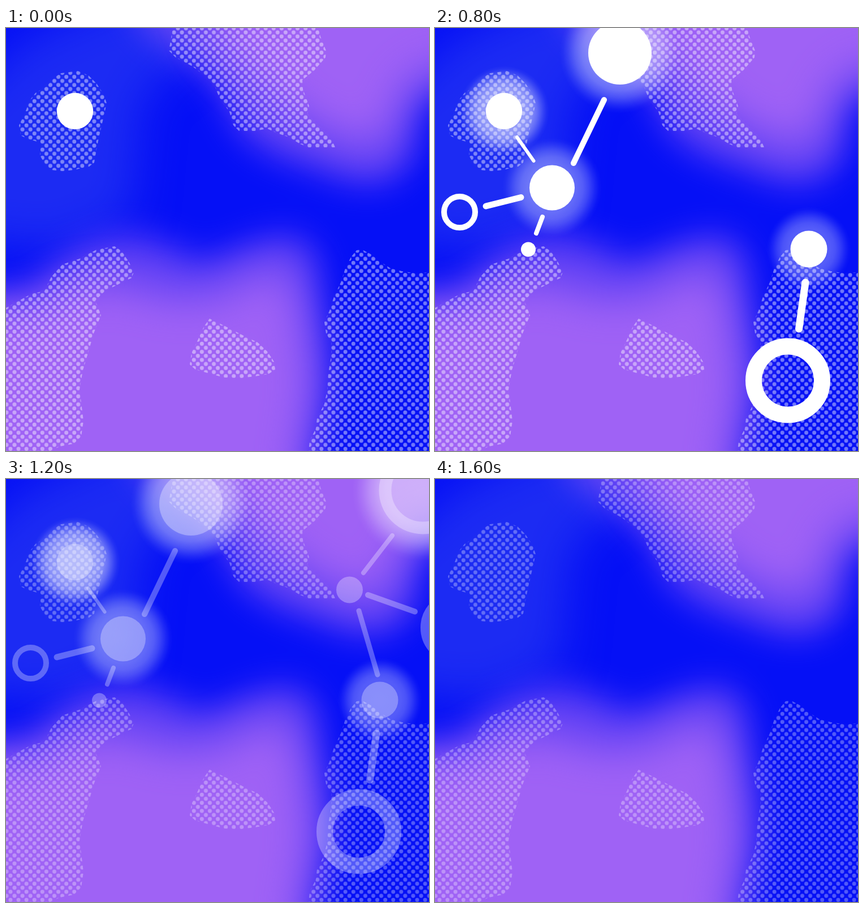
These frames come from a looping animation (748 px wide and 748 px high, 1.7 s). An HTML page:

```html
<!DOCTYPE html>
<html lang="en">
<head>
<meta charset="utf-8">
<title>Network loop</title>
<style>
  html, body { margin: 0; width: 100%; height: 100%; overflow: hidden; background: #0510f6; }
  svg { display: block; width: 100vw; height: 100vh; }
</style>
</head>
<body>
<svg id="stage" viewBox="0 0 748 748" xmlns="http://www.w3.org/2000/svg">
  <defs>
    <filter id="soft" filterUnits="userSpaceOnUse" x="-200" y="-200" width="1150" height="1150" color-interpolation-filters="sRGB">
      <feGaussianBlur stdDeviation="31"/>
    </filter>
    <filter id="softer" filterUnits="userSpaceOnUse" x="-200" y="-200" width="1150" height="1150" color-interpolation-filters="sRGB">
      <feGaussianBlur stdDeviation="38"/>
    </filter>
    <radialGradient id="halo">
      <stop offset="0" stop-color="#fff"/>
      <stop offset=".5" stop-color="#fff" stop-opacity=".96"/>
      <stop offset=".62" stop-color="#fff" stop-opacity=".84"/>
      <stop offset=".74" stop-color="#fff" stop-opacity=".58"/>
      <stop offset=".86" stop-color="#fff" stop-opacity=".25"/>
      <stop offset=".94" stop-color="#fff" stop-opacity=".07"/>
      <stop offset="1" stop-color="#fff" stop-opacity="0"/>
    </radialGradient>
    <pattern id="dots" patternUnits="userSpaceOnUse" x="579" y="208" width="14.1" height="14.3">
      <g id="cell" fill="#fff"></g>
    </pattern>
  </defs>

  <rect width="748" height="748" fill="#0510f6"/>
  <g filter="url(#softer)" fill="#1c2bf3">
    <path d="M40 20 L260 -80 L340 40 L240 120 L220 330 L90 390 L-80 370 L-80 130Z"/>
  </g>
  <g fill="#9f62f5">
    <g filter="url(#soft)" opacity=".58">
      <path d="M-80 468 L40 463 L90 420 L150 378 L220 366 L280 380 L340 415 L400 395 L450 375 L510 365 L548 400 L550 470 L562 560 L566 630 L556 690 L540 760 V850 H-80Z"/>
      <path d="M215 -80 L238 -10 L295 35 L355 75 L390 125 L415 185 L475 225 L555 252 L620 276 L680 272 L722 225 L724 160 L740 122 L780 112 H850 V-80Z"/>
    </g>
    <g filter="url(#softer)">
      <path d="M-120 500 L60 498 L120 455 L200 450 L300 478 L380 470 L450 432 L500 428 L518 475 L532 560 L540 630 L532 690 L520 760 V900 H-120Z"/>
      <path d="M315 -120 L375 20 L450 95 L520 160 L600 198 L655 212 L685 180 L700 115 L745 75 L900 60 V-120Z"/>
    </g>
  </g>

  <g id="halftone" fill="url(#dots)">
    <path d="M97 80 L127 76 L146 84 L160 98 L173 118 L178 133 L172 160 L165 190 L160 215 L156 238 L147 245 L120 251 L100 253 L80 251 L68 240 L60 225 L62 205 L52 200 L38 196 L26 190 L23 172 L33 152 L42 128 L52 115 L72 103 L85 88Z"/>
    <path d="M295 0 L288 40 L300 52 L330 68 L352 85 L368 100 L378 125 L395 148 L402 172 L412 182 H440 L462 178 L480 186 L500 193 L520 205 L535 211 H582 L575 195 L560 180 L545 165 L533 152 L536 138 L525 108 L524 92 L545 75 L565 52 L566 40 L556 15 L552 0Z"/>
    <path d="M0 495 L45 470 L68 465 L80 440 L100 418 L130 408 L160 392 L192 386 L205 395 L218 415 L226 432 L222 442 L205 450 L175 465 L158 482 L168 508 L155 540 L145 575 L136 605 L130 640 L134 670 L137 695 L133 722 L120 735 L95 740 L78 748 H0Z"/>
    <path d="M360 514 L385 526 L420 544 L445 556 L462 572 L474 590 L476 604 L464 612 L440 616 L415 619 L385 618 L360 611 L335 604 L325 595 L328 575 L340 550 L350 528Z"/>
    <path d="M630 392 L645 400 L660 412 L680 425 L700 430 L725 434 L748 432 V748 H535 L537 730 L548 708 L550 690 L563 665 L568 640 L570 610 L575 580 V555 L566 540 L563 520 L572 500 L580 475 L592 450 L600 425 L610 405 L620 393Z"/>
  </g>
  <g id="halos" fill="url(#halo)"></g>
  <g id="net" fill="none" stroke="#fff" stroke-linecap="round"></g>
</svg>
<script>
const STEP = 100, STEPS = 17;
const $ = id => document.getElementById(id);
const parts = [];

function add(parent, tag, attrs) {
  const el = document.createElementNS("http://www.w3.org/2000/svg", tag);
  for (const k in attrs) el.setAttribute(k, attrs[k]);
  parent.appendChild(el);
  return el;
}

// Each part appears at the step given first.
const keep = (from, el, glow) => parts.push({ from, el, glow });
const disc = (from, cx, cy, r) => keep(from, add($("net"), "circle", { cx, cy, r, fill: "#fff", stroke: "none" }));
const ring = (from, cx, cy, r, w) => keep(from, add($("net"), "circle", { cx, cy, r, "stroke-width": w }));
const link = (from, x1, y1, x2, y2, w) => keep(from, add($("net"), "line", { x1, y1, x2, y2, "stroke-width": w }));
const halo = (from, cx, cy, r, glow) => keep(from, add($("halos"), "circle", { cx, cy, r }), glow);

const dx = 14.1 / 2, dy = 14.3 / 2;
for (const [x, y] of [[0, 0], [2, 0], [0, 2], [2, 2], [1, 1]])
  add($("cell"), "circle", { cx: x * dx, cy: y * dy, r: 3.5 });

disc(0, 122, 147, 32.2);
halo(1, 122, 147, 80, .54);
link(1, 145, 193, 174.5, 235, 6);
disc(2, 207, 282.5, 40);
halo(2, 207, 282.5, 88, .37);
link(3, 190, 334, 179, 363, 8);
disc(3, 165, 391.5, 13);
link(4, 299, 127, 245, 239, 10);
disc(5, 327, 44, 56);
halo(5, 327, 44, 107, .45);
link(6, 90, 315, 152, 299.5, 11);
ring(6, 43.5, 325.5, 27.5, 10);
ring(6, 624, 623.5, 60.5, 29);
link(7, 655, 450, 643.5, 532, 13);
disc(8, 661, 391, 32.5);
halo(8, 661, 391, 75, .33);
link(9, 624, 233, 657, 346, 9);
disc(9, 607.5, 196, 23.5);
link(10, 683, 100, 632, 166, 8);
ring(10, 737, 20, 66.5, 22);
link(11, 640, 205, 723, 234.5, 10);
ring(12, 797, 263, 54, 20);
halo(12, 737, 20, 125, .5);

function draw(step) {
  const faded = step >= 10;
  const shapes = step < 10 ? 1 : step < 15 ? .3 : step < 16 ? .15 : 0;
  const light = step < 13 ? 1 : step < 14 ? .26 : step < 15 ? .12 : 0;
  $("halftone").setAttribute("opacity", faded ? .31 : .43);
  $("net").setAttribute("visibility", shapes ? "visible" : "hidden");
  for (const { from, el, glow } of parts)
    el.setAttribute("opacity", step < from ? 0 : glow ? glow * light : shapes);
}

const start = performance.now();
function tick() {
  draw(Math.floor((performance.now() - start) / STEP) % STEPS);
  requestAnimationFrame(tick);
}
tick();
</script>
</body>
</html>
```
